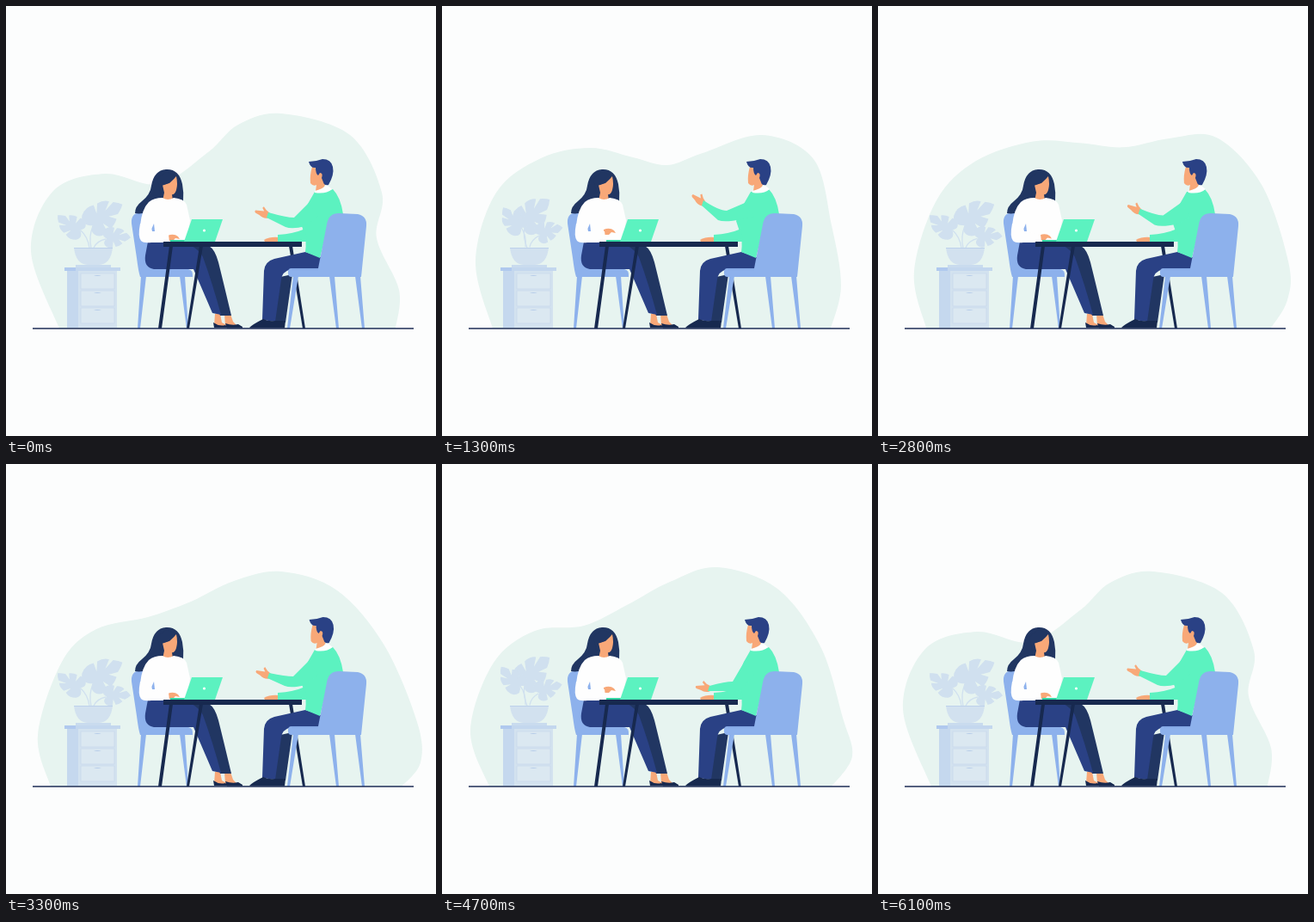
These frames come from a looping animation (500 by 500 pixels, 6.2 s). An HTML page:

```html
<!DOCTYPE html>
<html lang="en">
<head>
<meta charset="utf-8">
<title>Meeting</title>
<style>
  html, body { margin: 0; width: 100%; height: 100%; overflow: hidden; background: #fcfdfd; }
  svg { display: block; width: 100%; height: 100%; }
  .chair { fill: #8db1ec; }
  .navy { fill: #17294f; }
  .pants { fill: #2a4185; }
  .shade { fill: #213662; }
  .skin { fill: #f8a878; }
  .teal { fill: #5cf2c0; }
  .white { fill: #fefefe; }
  .leaf { fill: #d0e0ef; }
  .stem { fill: none; stroke: #d0e0ef; stroke-width: 1.3; }
</style>
</head>
<body>
<svg viewBox="0 0 500 500">
  <defs>
    <path id="leaf" d="M4 0Q-6-8 2-15Q10-20 18-16L15-7L22-15Q30-14 33-9L24-4L36-6Q40-2 42 2Q38 5 32 7L23 3L28 10Q22 14 17 14L14 5L12 15Q3 16 0 9Q-2 4 4 0Z"/>
    <g id="drawer">
      <rect x="87" y="311" width="39" height="18" fill="#dbe8f1" stroke="#c6d8ec" stroke-width=".7"/>
      <path d="M102 313H111Q106 315 102 313Z" fill="#b5cbe9"/>
    </g>
  </defs>

  <path id="blob" fill="#e7f4f0"/>

  <g id="plant" class="leaf">
    <g id="leafTop"><path class="stem" d="M99 281Q96 268 101 256"/><use href="#leaf" transform="translate(97 258) rotate(-38) scale(1.12)"/></g>
    <g id="leafLeft"><path class="stem" d="M97 281Q95 268 86 260"/><use href="#leaf" transform="translate(89 262) rotate(210) scale(.82)"/></g>
    <g id="leafRight"><path class="stem" d="M102 281Q106 273 116 271"/><use href="#leaf" transform="translate(114 271) rotate(-6) scale(.74)"/></g>
  </g>
  <path d="M79 281H124Q122 300 108 301H95Q81 300 79 281Z" fill="#d2e1ef"/>
  <path d="M79 281.5H124" stroke="#bdd1ea"/>
  <rect x="81" y="301" width="41" height="3" fill="#c9dbee"/>
  <rect x="71" y="307" width="14" height="67" fill="#c5d8ee"/>
  <rect x="84" y="307" width="45" height="67" fill="#d3e2ef"/>
  <use href="#drawer"/><use href="#drawer" y="20"/><use href="#drawer" y="40"/>
  <rect x="68" y="304" width="65" height="4" fill="#c3d7ee"/>
  <rect x="68" y="304" width="13" height="4" fill="#b0c9ee"/>

  <g id="woman">
    <path class="chair" d="M146 253Q145 241 156 240H168L172 306H212Q218 307 217 315H156Q154 309 152 293ZM157 314H163L156 375H153ZM202 314H208L212 375H210Z"/>
    <path class="shade" d="M186 190Q201 189 205 207Q207 217 206 228L196 232L180 225Q173 229 170 235Q162 243 150 241Q150 233 158 227Q168 219 169 209Q172 191 186 190Z"/>
    <path class="skin" d="M182 208L190 206L198 198Q200 207 198 214Q196 220 193 219L194 227H182L184 217Z"/>
    <path class="shade" d="M181 209Q193 206 198 197L186 193L176 201L179 216L183 217Z"/>
    <path class="skin" d="M243 358H249L251 368L258 372H242ZM254 358H261L264 367L270 373H255Z"/>
    <path class="navy" d="M241 368Q248 373 255 371L259 374H242ZM255 369Q263 372 270 370L275 373V374.500H257Z"/>
    <path class="shade" d="M205 279H236Q243 283 247 298Q253 322 262 360H249L225 300Z"/>
    <path class="pants" d="M165 274H205Q224 281 229 292Q240 322 250 359L240 357L218 306H172Q160 304 162 290Z"/>
    <path class="white" d="M182 223Q188 227 195 223Q207 224 210 231L214 249L210 275H165L166 258L156 255Q158 236 166 228Q172 223 182 223Z"/>
    <path class="chair" d="M168 262L172 253L173 262Z"/>
    <path id="typingHand" class="skin" d="M-2-3Q5-6 10-2L12 1L7 0L4 3H-2Z"/>
    <path id="typingSleeve" class="white"/>
  </g>

  <path class="navy" d="M329 279H333L348 375H345Z"/>

  <g id="man">
    <path class="shade" d="M319 315L333 312L325 368H312Z"/>
    <path class="pants" d="M348 286L366 292V306H331Q321 309 320 318L313 367L298 365L300 308Q301 297 312 294Z"/>
    <path class="navy" d="M283 374Q287 370 299 364Q305 367 313 366H325L324 374.500H284Z"/>
    <path class="teal" d="M359 216Q371 218 380 213Q389 222 392 242L376 250L365 293L348 286Q350 273 346 262L342 250Q348 238 351 230Z"/>
    <g id="head">
      <path class="skin" d="M356 187Q353 197 354 206Q357 210 361 208L360 215Q367 217 371 208L370 192Z"/>
      <path class="white" d="M359 215Q368 213 373 208L379 213Q372 219 359 217Z"/>
      <path class="pants" d="M352 181Q360 181 368 178Q378 178 380 187Q382 196 375 208Q370 209 369 205L367 200Q369 194 365 194L363 197Q360 195 360 188Q354 189 352 181Z"/>
    </g>
    <path class="skin" d="M300 272Q307 268 317 269V274H301Z"/>
    <path class="teal" d="M348 259Q334 265 316 266V274H350Z"/>
    <path id="hand" class="skin" d="M2-3L-3-5L-7-8L-8-6L-5-3L-15-1Q-16 1-14 2L-9 3Q-3 6 2 3Z"/>
    <path id="arm" class="teal"/>
    <path class="chair" d="M373 254Q375 241 387 241L409 242Q420 244 419 256L413 315H332Q328 315 328 311V309Q328 305 332 305H363ZM334 314H340L330 375H327ZM376 314H382L387 375H384ZM406 314H412L417 375H414Z"/>
    <path d="M332 306H363" stroke="#7c9fdd" stroke-width=".8"/>
  </g>

  <path class="navy" d="M183 274H344V280H183ZM190 279H194L181 375H177ZM225 279H229L213 375H210Z"/>
  <path d="M191 272H242V274H191Z" fill="#35d6a4"/>
  <path class="teal" d="M216 248H252L243 274H207Z"/>
  <circle class="white" cx="230.500" cy="261" r="1.600"/>
  <path d="M31 375H474" stroke="#1d2d56" stroke-width="1.700"/>
</svg>
<script>
const LOOP = 6200;
const KEYS = [0, 1300, 2200, 3300, 3800, 4700, 5800, LOOP];
const $ = id => document.getElementById(id);

// Outline poses: first and last entries are x on the floor, the rest x,y pairs.
const blobPoses = [
  [62, 29,285, 55,215, 115,195, 178,207, 235,170, 270,138, 320,125, 400,150, 437,217, 431,270, 457,330, 453],
  [59, 39,297, 63,217, 115,177, 172,165, 222,176, 262,185, 303,171, 372,150, 432,178, 453,255, 464,325, 452],
  [62, 46,300, 70,222, 125,170, 200,140, 260,158, 312,189, 355,178, 405,158, 455,203, 473,290, 469,333, 452],
  [52, 37,315, 65,230, 105,192, 165,178, 215,160, 265,136, 320,125, 385,147, 440,211, 478,300, 482,347, 460],
  [54, 35,315, 62,233, 110,193, 165,183, 215,160, 265,131, 315,113, 385,145, 440,215, 477,300, 486,345, 460],
  [55, 33,310, 60,231, 108,194, 165,188, 215,164, 265,137, 320,120, 390,145, 440,212, 466,295, 477,340, 453]
];
const blobTracks = blobPoses[0].map((_, i) => blobPoses.map(pose => pose[i]));

const tracks = {
  leafLeft: [0, 1, 0, 0, .35, .8],
  leafTop: [0, 1, .2, 0, .4, 1],
  leafRight: [0, .9, .4, 0, .3, 1],
  typing: [0, 1, .3, 0, .15, 1],
  lean: [0, 2, 3, .6, 0, 0],
  wristX: [304, 303, 303, 305, 308, 310],
  wristY: [243, 229, 232.5, 246, 259, 261],
  elbowX: [335, 331, 330, 334, 338, 338],
  elbowY: [246, 238, 240, 247, 252, 253],
  handTurn: [18, 38, 35, 20, 11, 8]
};

// Smooth keyed value that rests at its extremes and returns to the first pose.
function valueAt(track, t) {
  const v = i => i < track.length ? track[i] : track[0];
  const slope = i => {
    if (i < 1 || i > 5 || (v(i) - v(i - 1)) * (v(i + 1) - v(i)) <= 0) return 0;
    return (v(i + 1) - v(i - 1)) / (KEYS[i + 1] - KEYS[i - 1]);
  };
  let i = 0;
  while (t >= KEYS[i + 1]) i++;
  const span = KEYS[i + 1] - KEYS[i], u = (t - KEYS[i]) / span, w = 1 - u;
  return v(i) * w * w * (1 + 2 * u) + v(i + 1) * u * u * (3 - 2 * u)
    + span * u * w * (slope(i) * w - slope(i + 1) * u);
}

function splinePath(p) {
  let d = `M${p[0]}`;
  for (let i = 0; i < p.length - 1; i++) {
    const a = p[i - 1] || p[i], b = p[i], c = p[i + 1], e = p[i + 2] || c;
    const c1 = b.map((n, k) => n + (c[k] - a[k]) / 6);
    const c2 = c.map((n, k) => n - (e[k] - b[k]) / 6);
    d += `C${c1} ${c2} ${c}`;
  }
  return d + 'Z';
}

function draw(t) {
  const s = {};
  for (const name in tracks) s[name] = valueAt(tracks[name], t);

  const b = blobTracks.map(track => valueAt(track, t));
  const points = [[b[0], 375]];
  for (let i = 1; i < b.length - 1; i += 2) points.push([b[i], b[i + 1]]);
  points.push([b[b.length - 1], 375]);
  $('blob').setAttribute('d', splinePath(points));

  const move = (id, transform) => $(id).setAttribute('transform', transform);
  move('leafLeft', `rotate(${15 * s.leafLeft} 100 281)`);
  move('leafTop', `rotate(${-11 * s.leafTop} 100 281)`);
  move('leafRight', `rotate(${-17 * s.leafRight} 100 281)`);

  const lift = 7 * s.typing;
  move('typingHand', `translate(190 ${270 - lift})`);
  $('typingSleeve').setAttribute('d',
    `M156 253Q153 268 157 273Q160 276 169 275L190 ${274 - lift * .6}L189 ${266 - lift * .6}L170 262L168 253Z`);

  move('head', `translate(${s.lean})`);
  const { wristX: wx, wristY: wy, elbowX: ex, elbowY: ey } = s;
  move('hand', `translate(${wx} ${wy}) rotate(${s.handTurn})`);
  $('arm').setAttribute('d', `M${wx + 1} ${wy - 3}Q${ex - 9} ${ey} ${ex} ${ey}L352 229L363 245L348 ${ey + 10}`
    + `Q${ex - 2} ${ey + 14} ${ex - 10} ${ey + 11}L${wx - 1} ${wy + 3}Z`);
}

function frame() {
  draw(Math.floor(performance.now() % LOOP / 100) * 100);
  requestAnimationFrame(frame);
}
frame();
</script>
</body>
</html>
```
